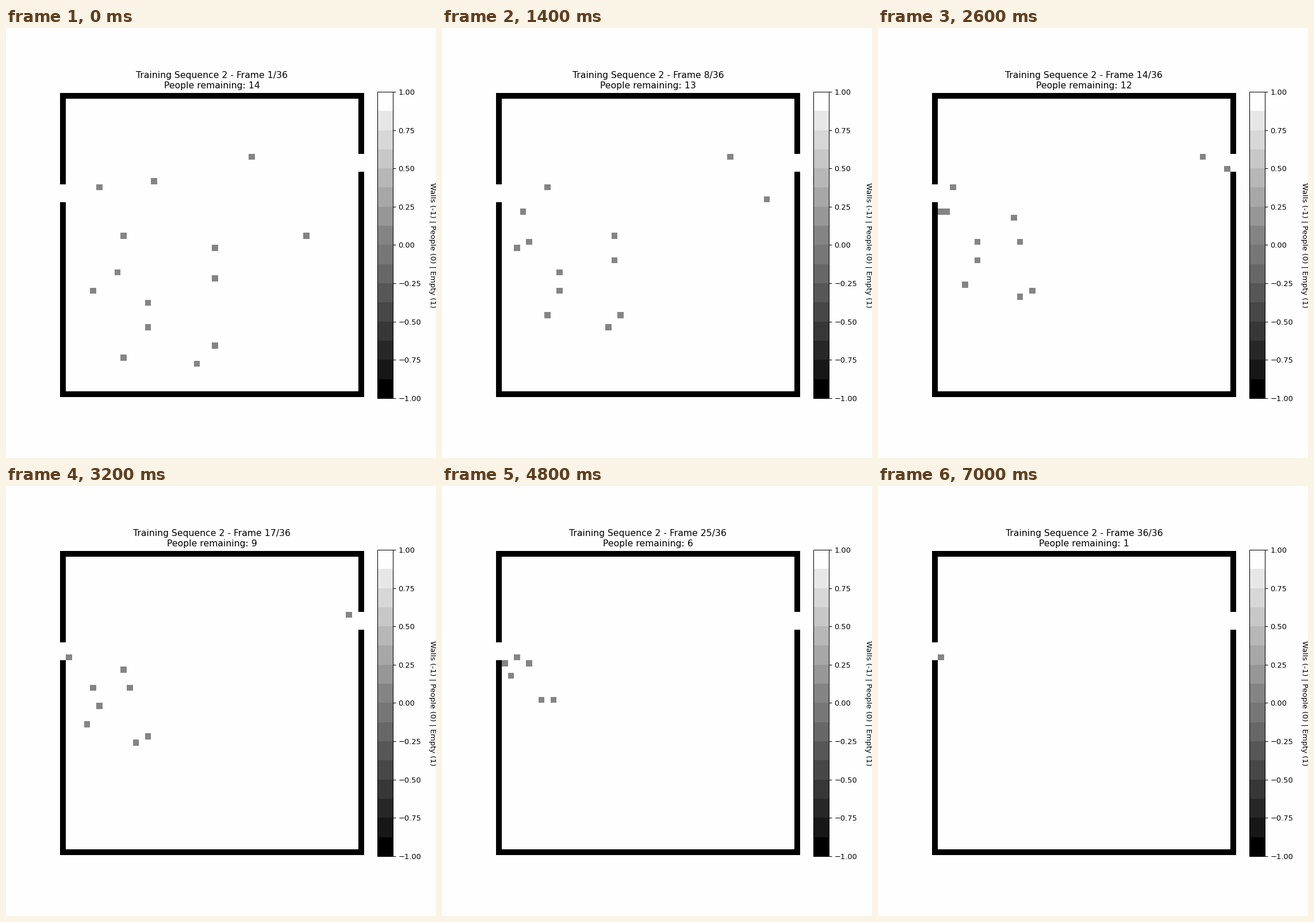
Recreate the animation shown at these times as a matplotlib script. Size 748 by 748 pixels, loop 7.2 s.

```python
import matplotlib.pyplot as plt
import numpy as np
from matplotlib.animation import FuncAnimation
from matplotlib.colors import ListedColormap

SIZE = 50
LAST = SIZE - 1
FRAMES = 36
WALL, PERSON, EMPTY = -1, 0, 1
# First row of each door; a door is three cells high.
LEFT_DOOR, RIGHT_DOOR = 15, 10
DOOR_HEIGHT = 3

# Where each person starts (column, row) and the pace in cells per step.
PEOPLE = [
    (31, 10, 1), (15, 14, 0.95), (6, 15, 1), (10, 23, 1), (40, 23, 1),
    (25, 25, 0.99), (9, 29, 0.93), (25, 30, 0.98), (5, 32, 1.03),
    (14, 34, 0.94), (14, 38, 0.99), (25, 41, 0.98), (10, 43, 1.02),
    (22, 44, 1.04),
]


def locate(col, row, pace, step):
    """Cell on the straight walk to the nearer door, or None once outside."""
    goal_left = np.array([0, LEFT_DOOR + 0.5])
    goal_right = np.array([LAST, RIGHT_DOOR + 0.5])
    start = np.array([col, row])
    goal = min(goal_left, goal_right, key=lambda g: np.hypot(*(g - start)))
    path = goal - start
    done = min(1, pace * step / np.hypot(*path))
    x, y = np.floor(start + done * path + 0.5).astype(int)
    return (x, y) if 0 < x < LAST else None


def empty_room():
    room = np.full((SIZE, SIZE), WALL, dtype=float)
    room[1:-1, 1:-1] = EMPTY
    for door, col in ((LEFT_DOOR, 0), (RIGHT_DOOR, LAST)):
        room[door:door + DOOR_HEIGHT, col] = EMPTY
    return room


# Sixteen even greys, with the dominant ones near black, mid grey and white.
levels = [16 * k + 7 for k in range(16)]
levels[0], levels[8], levels[15] = 0, 132, 254
greys = ListedColormap([(v / 255,) * 3 for v in levels])

fig, ax = plt.subplots(figsize=(8, 8), dpi=93.5, facecolor=greys(15))
fig.subplots_adjust(left=0.125, right=0.8999, bottom=0.11, top=0.8807)
grid = ax.pcolormesh(empty_room(), cmap=greys, vmin=-1, vmax=1)
ax.set_aspect("equal")
ax.invert_yaxis()
ax.axis("off")
bar = fig.colorbar(grid, ax=ax, fraction=0.046, pad=0.04)
bar.set_label("Walls (-1) | People (0) | Empty (1)", rotation=270, labelpad=20)
title = ax.set_title("")


def draw(step):
    room = empty_room()
    cells = [cell for cell in (locate(*p, step) for p in PEOPLE) if cell]
    for col, row in cells:
        room[row, col] = PERSON
    grid.set_array(room)
    title.set_text(f"Training Sequence 2 - Frame {step + 1}/{FRAMES}\n"
                   f"People remaining: {len(cells)}")
    return grid, title


anim = FuncAnimation(fig, draw, frames=FRAMES, interval=200, repeat=True)
plt.show()
```
